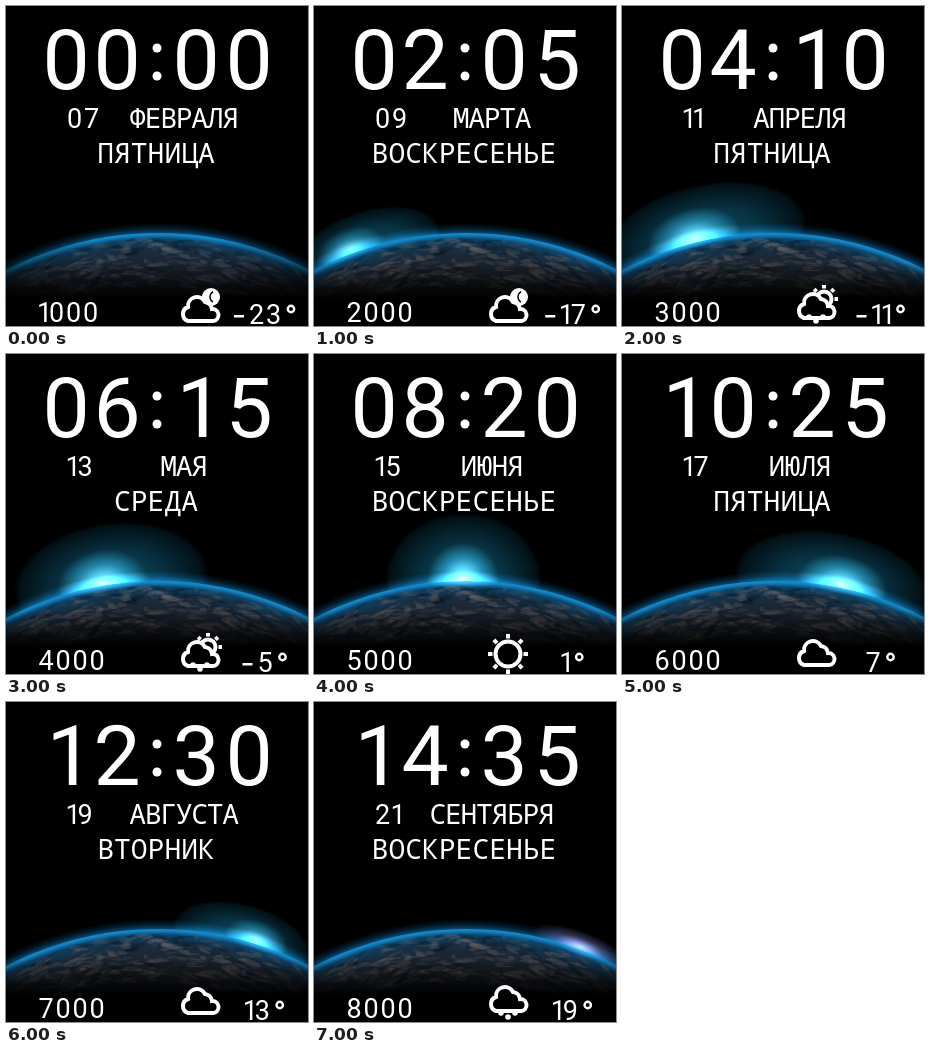
An HTML page with a canvas that plays this animation: 302x320 px, repeating every 8 s.

```html
<!DOCTYPE html>
<html lang="ru">
<head>
<meta charset="utf-8">
<style>
html, body { margin: 0; width: 100%; height: 100%; overflow: hidden; background: #000; }
canvas { display: block; }
</style>
</head>
<body>
<canvas id="face" width="302" height="320"></canvas>
<script>
const ctx = document.getElementById('face').getContext('2d');
const TAU = Math.PI * 2;
const EARTH = { x: 152, y: 556, r: 329 };
const CLOUD = new Path2D('M182 311a7.4 7.4 0 0 1 0-14a9 9 0 0 1 17-5a8 8 0 0 1 7 7a6 6 0 0 1 1 12z');
const DIGITS = 'Roboto, sans-serif';
const LETTERS = '"Noto Sans Mono", monospace';

// sun: x, y, horizontal radius, vertical radius, strength
const STATES = [
  { month: 'ФЕВРАЛЯ', day: 'ПЯТНИЦА', icon: 'moon' },
  { month: 'МАРТА', day: 'ВОСКРЕСЕНЬЕ', icon: 'moon', sun: [36, 243, 75, 38, 0.6] },
  { month: 'АПРЕЛЯ', day: 'ПЯТНИЦА', icon: 'partly', sun: [72, 232, 102, 54, 0.85] },
  { month: 'МАЯ', day: 'СРЕДА', icon: 'partly', sun: [97, 229, 98, 60, 0.9] },
  { month: 'ИЮНЯ', day: 'ВОСКРЕСЕНЬЕ', icon: 'sun', sun: [149, 225, 78, 66, 1] },
  { month: 'ИЮЛЯ', day: 'ПЯТНИЦА', icon: 'cloud', sun: [220, 230, 98, 52, 0.9] },
  { month: 'АВГУСТА', day: 'ВТОРНИК', icon: 'cloud', sun: [250, 238, 70, 36, 0.7] },
  { month: 'СЕНТЯБРЯ', day: 'ВОСКРЕСЕНЬЕ', icon: 'rain', sun: [266, 244, 50, 15, 0.8], haze: true }
];

function randomFrom(seed) {
  return () => (seed = seed * 16807 % 2147483647) / 2147483647;
}

function gradient(g, stops) {
  stops.forEach(([at, color]) => g.addColorStop(at, color));
  return g;
}

function disc(x, y, r) {
  ctx.beginPath();
  ctx.arc(x, y, r, 0, TAU);
}

// An elliptical light lying along the horizon.
function light(x, y, rx, ry, strength, stops) {
  ctx.save();
  ctx.globalCompositeOperation = 'lighter';
  ctx.globalAlpha = strength;
  ctx.translate(x, y);
  ctx.rotate(Math.asin((x - EARTH.x) / EARTH.r));
  ctx.scale(rx, ry);
  ctx.fillStyle = gradient(ctx.createRadialGradient(0, 0, 0, 0, 0, 1), stops);
  disc(0, 0, 1);
  ctx.fill();
  ctx.restore();
}

function sunGlow([x, y, rx, ry, strength], haze) {
  if (haze) return light(x, y, rx, ry, strength, [[0, '#a4a0c8'], [0.4, '#4c5080'], [1, '#000']]);
  light(x + (EARTH.x - x) * 0.15, y, rx, ry, 1, [[0, '#0c4a60'], [0.5, '#083445'], [0.94, '#021016'], [1, '#000']]);
  light(x, y, rx * 0.46, ry * 0.55, strength, [[0, '#a0d4dc'], [0.25, '#5aa4b6'], [0.55, '#1d5568'], [1, '#000']]);
}

function halo() {
  const { x, y, r } = EARTH;
  ctx.fillStyle = gradient(ctx.createRadialGradient(x, y, r - 2, x, y, r + 10),
    [[0, '#0b6aa4'], [0.25, '#063f64'], [0.55, '#021b2c'], [1, '#000']]);
  disc(x, y, r + 10);
  ctx.fill();
}

function earth(sun) {
  const { x, y, r } = EARTH;
  const at = depth => 1 - depth / 60;
  ctx.save();
  disc(x, y, r);
  ctx.clip();
  ctx.fillStyle = gradient(ctx.createRadialGradient(x, y, r - 60, x, y, r), [
    [0, '#171b20'], [at(26), '#1c2632'], [at(13), '#173147'], [at(6), '#0e4468'],
    [at(2), '#1280c0'], [1, '#1a8cca']
  ]);
  ctx.fillRect(0, 200, 302, 120);

  const random = randomFrom(4711);
  const land = sun ? '124,112,110' : '100,110,122';
  for (let i = 0; i < 420; i++) {
    const angle = (random() - 0.5) * 1.02;
    const depth = 6 + random() * 46;
    ctx.fillStyle = `rgba(${random() < 0.35 ? '4,14,24' : land},${0.08 + random() * 0.22})`;
    ctx.beginPath();
    ctx.ellipse(x + Math.sin(angle) * (r - depth), y - Math.cos(angle) * (r - depth),
      2 + random() * 9, 0.7 + random() * 2, angle + random() * 0.6 - 0.3, 0, TAU);
    ctx.fill();
  }
  ctx.restore();

  ctx.fillStyle = gradient(ctx.createLinearGradient(0, 256, 0, 293), [[0, '#0000'], [1, '#000']]);
  ctx.fillRect(0, 256, 302, 64);
  ctx.fillStyle = gradient(ctx.createLinearGradient(0, 0, 302, 0),
    [[0, '#0007'], [0.3, '#0000'], [0.7, '#0000'], [1, '#0007']]);
  if (!sun) ctx.fillRect(0, 200, 302, 120);
}

function text(string, x, y, size, family, spacing = 0) {
  ctx.font = `${size}px ${family}`;
  ctx.letterSpacing = spacing + 'px';
  ctx.fillText(string, x, y);
}

const advance = c => c === '1' ? 10.5 : c === '°' ? 13 : 17;

// Proportional figures; "1" is narrow.
function number(string, x, y) {
  for (const c of string) {
    if (c === '°') {
      ctx.lineWidth = 2.4;
      disc(x + 8, y - 15, 3.2);
      ctx.stroke();
    } else {
      text(c, c === '1' ? x - 1.5 : x, y, 27, DIGITS);
    }
    x += advance(c);
  }
}

function clock(hours, minutes) {
  [...hours + ':' + minutes].forEach((c, i) => {
    if (c === ':') {
      for (const y of [42, 70]) {
        disc(151, y, 4.5);
        ctx.fill();
      }
    } else {
      text(c, [60, 111, 0, 190, 243][i] + (c === '1' ? 4 : 0), 83, 84, DIGITS);
    }
  });
}

function sunIcon(x, y, r, reach) {
  disc(x, y, r);
  ctx.stroke();
  for (let i = 0; i < 8; i++) {
    const c = Math.cos(i * TAU / 8), s = Math.sin(i * TAU / 8);
    ctx.beginPath();
    ctx.moveTo(x + c * (r + 3), y + s * (r + 3));
    ctx.lineTo(x + c * reach, y + s * reach);
    ctx.stroke();
  }
}

function cloudIcon(dy) {
  ctx.save();
  ctx.translate(0, dy);
  ctx.fillStyle = '#000';
  ctx.fill(CLOUD);
  ctx.stroke(CLOUD);
  ctx.restore();
}

function weather(icon) {
  ctx.lineWidth = 4;
  if (icon === 'sun') return sunIcon(194, 300, 12.5, 20);
  if (icon === 'partly') sunIcon(202, 293, 7.5, 14);
  cloudIcon({ moon: 4, partly: 1, cloud: 0, rain: -2 }[icon]);
  if (icon === 'moon') {
    disc(205, 291, 9);
    ctx.fill();
    ctx.strokeStyle = '#000';
    ctx.lineWidth = 1.5;
    ctx.beginPath();
    ctx.arc(210, 291, 6, 2.1, 4.2);
    ctx.stroke();
  }
  if (icon === 'rain' || icon === 'partly') {
    for (const [x, y] of [[187, 311], [194, 315], [201, 311]]) {
      disc(x, y, 2.8);
      ctx.fill();
    }
  }
}

function draw(step) {
  const { month, day, icon, sun, haze } = STATES[step];
  const pad = n => String(n).padStart(2, '0');
  ctx.fillStyle = '#000';
  ctx.fillRect(0, 0, 302, 320);
  halo();
  if (sun) sunGlow(sun, haze);
  earth(sun);
  if (sun) light(sun[0], sun[1] + 1, sun[2] * 0.5, 9, sun[4] * 0.6, [[0, haze ? '#8880a8' : '#70a8b0'], [1, '#000']]);

  ctx.fillStyle = ctx.strokeStyle = '#fff';
  ctx.textAlign = 'center';
  clock(pad(step * 2), pad(step * 5));
  text(month, 177.5, 122, 28, LETTERS, -1.3);
  text(day, 150, 156.5, 28, LETTERS);

  ctx.textAlign = 'left';
  number(pad(7 + step * 2), 61, 122);
  number(String((step + 1) * 1000), 32.5, 316);

  const degrees = step * 6 - 23;
  const value = Math.abs(degrees) + '°';
  const minus = degrees < 0 ? 16 : 0;
  const width = [...value].reduce((sum, c) => sum + advance(c), minus);
  const left = 259.5 - width / 2;
  if (minus) ctx.fillRect(left, 309, 10, 2.5);
  number(value, left + minus - 1, 318);
  weather(icon);
}

let shown = -1;
function tick(now) {
  const step = Math.floor(now / 1000) % STATES.length;
  if (step !== shown) draw(shown = step);
  requestAnimationFrame(tick);
}
tick(performance.now());
</script>
</body>
</html>
```
